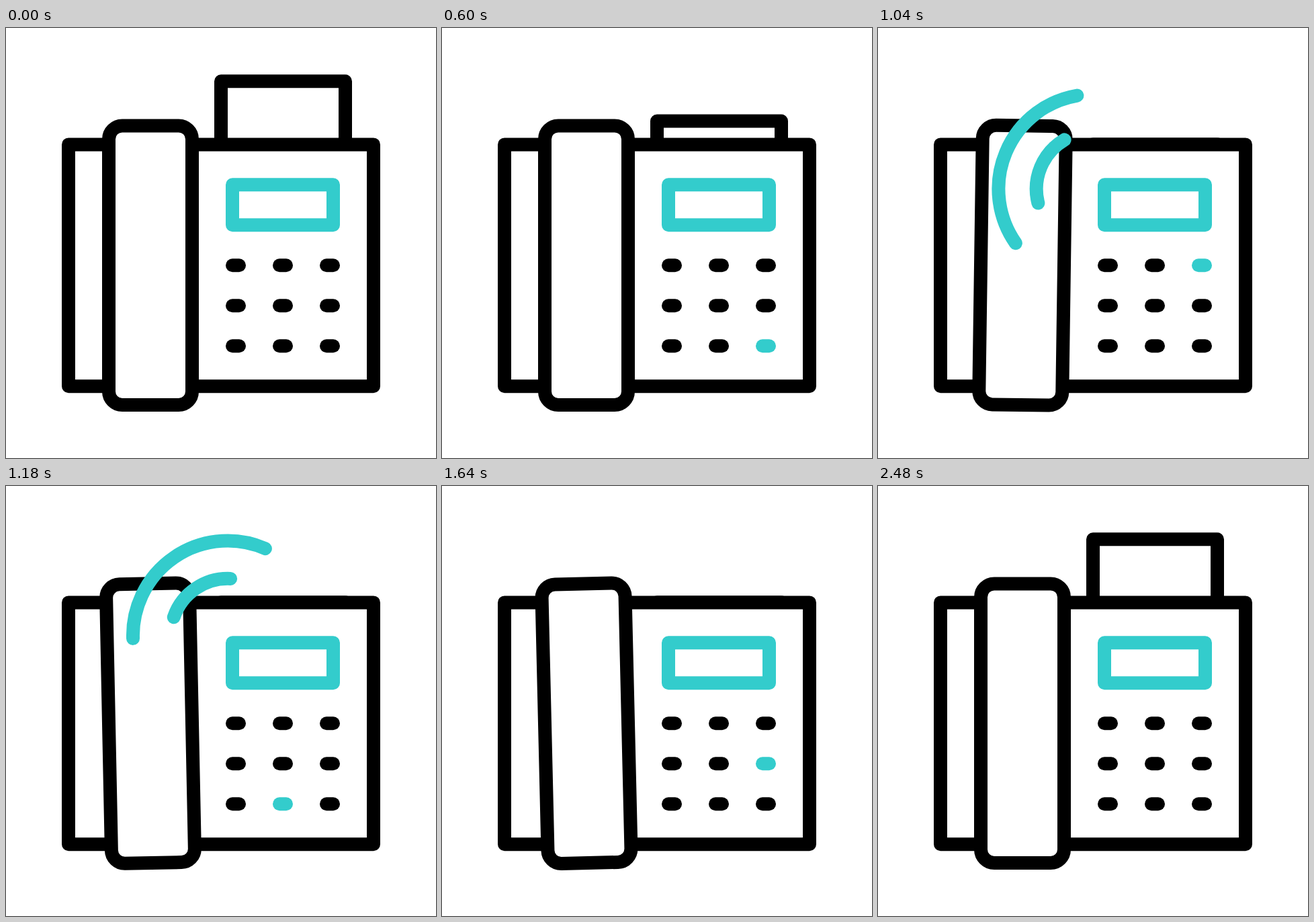
Write an HTML page that moves like this. It is 640 by 640 pixels and loops after 2.85 s.

```html
<!DOCTYPE html>
<html>
<head>
<meta charset="utf-8">
<style>
html, body { margin: 0; height: 100%; overflow: hidden; background: #fff; }
svg { display: block; width: 100vw; height: 100vh; }
path, rect { fill: #fff; stroke: #000; stroke-width: 20; stroke-linejoin: round; stroke-linecap: round; }
.accent { stroke: #3cc; }
#waves path { fill: none; }
</style>
</head>
<body>
<svg viewBox="0 0 640 640">
  <rect id="paper" x="320" y="79.3" width="185" height="110"/>
  <rect x="93" y="173.4" width="454" height="359.8"/>
  <rect class="accent" x="337" y="233.2" width="150" height="60"/>
  <g id="keys"></g>
  <rect id="handset" x="153" y="145.4" width="124" height="415.6" rx="20"/>
  <g id="waves">
    <path class="accent" d="M-51 36.5A85 85 0 0 1 51 36.5"/>
    <path class="accent" d="M-119 28.5A141 141 0 0 1 119 28.5"/>
  </g>
</svg>
<script>
const LOOP = 2850;
const DIAL_START = 460, KEY_TIME = 180;
const DIAL_ORDER = [8, 1, 6, 2, 7, 0, 5, 4, 3]; // keys numbered row by row
const RING_START = 762, RING_PERIOD = 288, RING_END = RING_START + 3.5 * RING_PERIOD;

const byId = id => document.getElementById(id);
const paper = byId('paper'), handset = byId('handset'), waves = byId('waves');

const keys = DIAL_ORDER.map((_, i) => {
  const key = document.createElementNS('http://www.w3.org/2000/svg', 'path');
  key.setAttribute('d', `M${337 + i % 3 * 70} ${353.2 + Math.floor(i / 3) * 60}h10`);
  return byId('keys').appendChild(key);
});

// Smooth progress from 0 to 1 between two times
function ease(t, from, to) {
  const u = Math.min(1, Math.max(0, (t - from) / (to - from)));
  return u * u * (3 - 2 * u);
}

function draw(t) {
  const drop = 94 * (ease(t, 460, 700) - ease(t, 1780, 2020));
  paper.setAttribute('transform', `translate(0 ${drop})`);

  const ringing = t > RING_START && t < RING_END;
  const tilt = ringing ? -4.2 * Math.sin((t - RING_START) / RING_PERIOD * 2 * Math.PI) : 0;
  handset.setAttribute('transform', `rotate(${tilt} 215 353.2)`);

  const lit = DIAL_ORDER[Math.floor((t - DIAL_START) / KEY_TIME)];
  keys.forEach((key, i) => key.classList.toggle('accent', i === lit));

  // The signal rises off the handset and turns upright
  const rise = ease(t, 1010, 1350);
  waves.style.display = t >= 1010 && t < 1560 ? '' : 'none';
  waves.setAttribute('transform',
    `translate(${222 + 98 * rise} ${202.5 - 131 * rise}) rotate(${-69 * (1 - rise)})`);
}

const start = performance.now();
function tick() {
  draw((performance.now() - start) % LOOP);
  requestAnimationFrame(tick);
}
tick();
</script>
</body>
</html>
```
